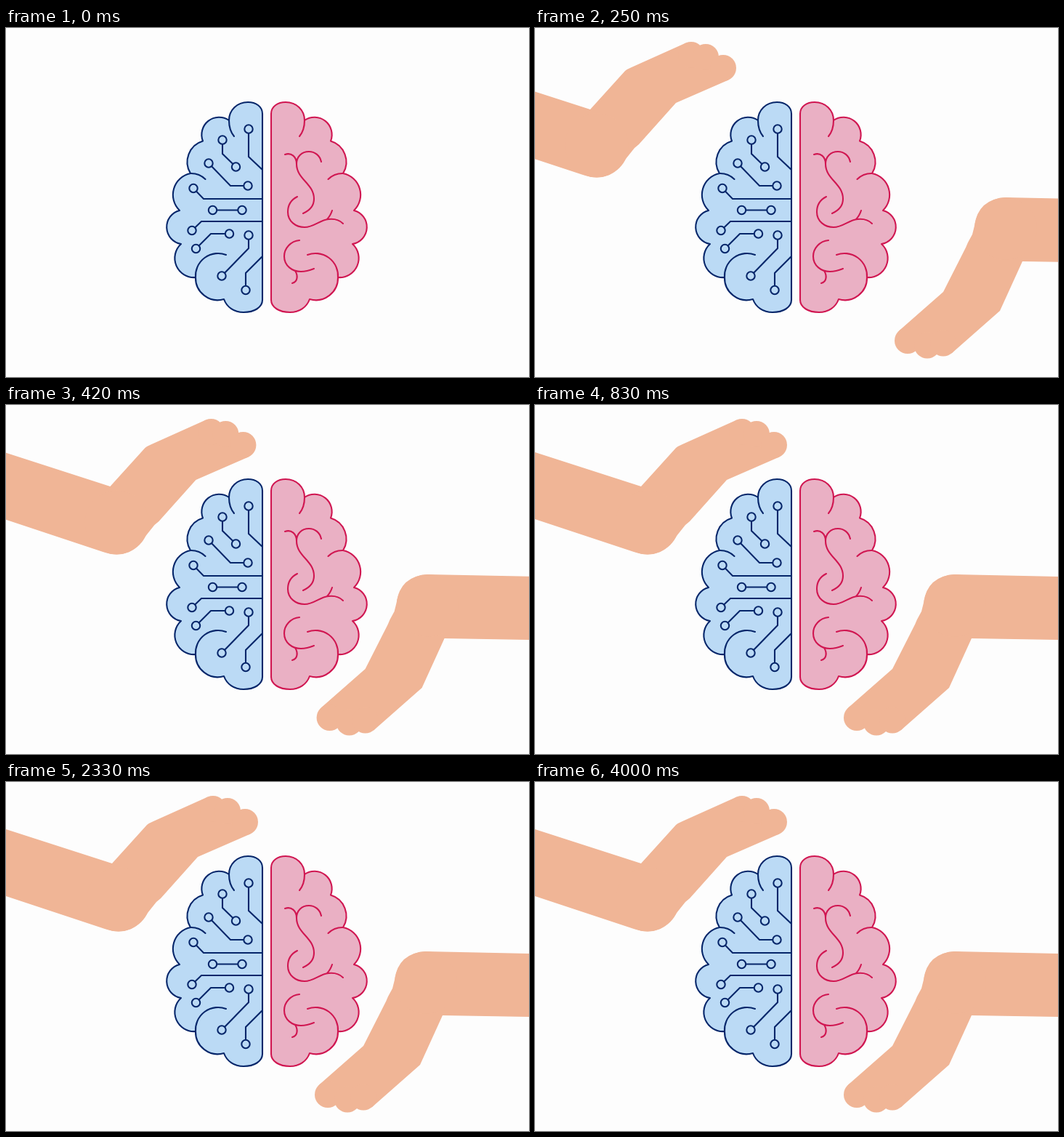
An HTML page with a canvas for the animation above (4080 ms loop, 720 by 480 pixels).

```html
<!DOCTYPE html>
<html lang="en">
<head>
<meta charset="utf-8">
<title>Brain and hands</title>
<style>
  html, body { margin: 0; width: 100%; height: 100%; overflow: hidden; background: #fdfdfd; }
  canvas { display: block; }
</style>
</head>
<body>
<canvas id="stage" width="720" height="480"></canvas>
<script>
const ctx = document.getElementById('stage').getContext('2d');
const LOOP = 4080, FPS = 12, ENTER = 0.5, TRAVEL = 560;
const SKIN = '#f0b596';
const BLUE = { fill: '#bbdaf5', line: '#06266a' };
const PINK = { fill: '#eab0c4', line: '#d01651' };

// Left half; the right half is its mirror image.
const half = new Path2D(`M353 118C353 108 344 102 333 102C318 102 307 113 307 127
  A24 24 0 0 0 271 155.5A30 30 0 0 0 254 200A30 30 0 0 0 239 251
  A23.5 23.5 0 0 0 241 297A26.5 26.5 0 0 0 261 343A30.5 30.5 0 0 0 300 373
  C304 384 314 391 327 391C342 391 353 384 353 374Z`);
const folds = new Path2D(`M307 127C307 137 309 143 314 149
  M274.5 208A28 28 0 0 0 254 200M303 312A31 31 0 0 0 261 343`);

const wires = new Path2D(`M334 139V177L353 195M298 154V173L316.5 191
  M279 186L309 217H333M258 220.5L272 235H353M284.5 250.5H325
  M256 278.5L269 266H353M307.5 283H282L261.5 303.5
  M334 285V303L297 341M353 314L330 337V360.5`);
const nodes = [[334, 139], [298, 154], [316.5, 191], [279, 186], [333, 217],
  [258, 220.5], [284.5, 250.5], [325, 250.5], [256, 278.5], [307.5, 283],
  [261.5, 303.5], [334, 285], [297, 341], [330, 360.5]];

const curls = new Path2D(`M434 184C432 175 425 170 417 170C407 170 400 177 400 187
  C400 208 424 214 424 235C424 245 418 251 409 255M384 174C393 171 400 177 400 187
  M401 232C391 237 388 245 388 253C388 266 399 274 411 274
  C424 274 432 264 444 263C453 262 459 264 464 269M449 251C447 257 445 260 442 263
  M404 292C392 293 383 303 383 314C383 327 394 335 406 335C413 335 419 333 424 331
  M398 334C402 340 402 349 394 351`);

const leftHand = {
  shape: new Path2D(`M-20 58.6L146 112L194 59Q197 56.5 203 54L277.7 20.6L329 55L336.3 71.4
    L264 103L213 160L207 165L195 180Q180 205 155 205.5Q147 205.5 136 202L-20 150.4Z`),
  tips: [[285, 37], [305, 40], [329, 55]]
};
const rightHand = {
  shape: new Path2D(`M740 236.3L578 233Q540 235 535 272L532 284L526 295L523 302L492 363L431 416.5
    L443 430L492 434L503.5 447.5L570 389L601 321L740 323.3Z`),
  tips: [[443, 430], [470, 436.5], [492, 433.5]]
};

function circle(x, y, r) {
  ctx.beginPath();
  ctx.arc(x, y, r, 0, Math.PI * 2);
}

function drawHand(hand, shift) {
  ctx.save();
  ctx.translate(shift, 0);
  ctx.fillStyle = SKIN;
  ctx.fill(hand.shape);
  for (const [x, y] of hand.tips) {
    circle(x, y, 18);
    ctx.fill();
  }
  if (hand === leftHand) circle(155, 161.5, 44);
  else circle(578, 276, 43);
  ctx.fill();
  ctx.restore();
}

function drawHalf(colors, mirrored) {
  ctx.save();
  if (mirrored) {
    ctx.translate(718, 0);
    ctx.scale(-1, 1);
  }
  ctx.fillStyle = colors.fill;
  ctx.strokeStyle = colors.line;
  ctx.fill(half);
  ctx.stroke(half);
  ctx.stroke(folds);
  ctx.restore();
}

function drawBrain() {
  ctx.lineWidth = 2.1;
  ctx.lineCap = 'round';
  ctx.lineJoin = 'round';
  drawHalf(BLUE, false);
  drawHalf(PINK, true);
  ctx.strokeStyle = PINK.line;
  ctx.stroke(curls);
  ctx.strokeStyle = BLUE.line;
  ctx.fillStyle = BLUE.fill;
  ctx.lineCap = 'butt';
  ctx.lineJoin = 'miter';
  ctx.stroke(wires);
  for (const [x, y] of nodes) {
    circle(x, y, 5.7);
    ctx.fill();
    ctx.stroke();
  }
}

function render(now) {
  const step = Math.floor((now % LOOP + 5) * FPS / 1000);
  const left = 1 - Math.min(step / FPS / ENTER, 1);
  const shift = TRAVEL * left ** 3;
  ctx.fillStyle = '#fdfdfd';
  ctx.fillRect(0, 0, 720, 480);
  drawHand(leftHand, -shift);
  drawHand(rightHand, shift);
  drawBrain();
}

const start = performance.now();
function tick() {
  render(performance.now() - start);
  requestAnimationFrame(tick);
}
tick();
</script>
</body>
</html>
```
